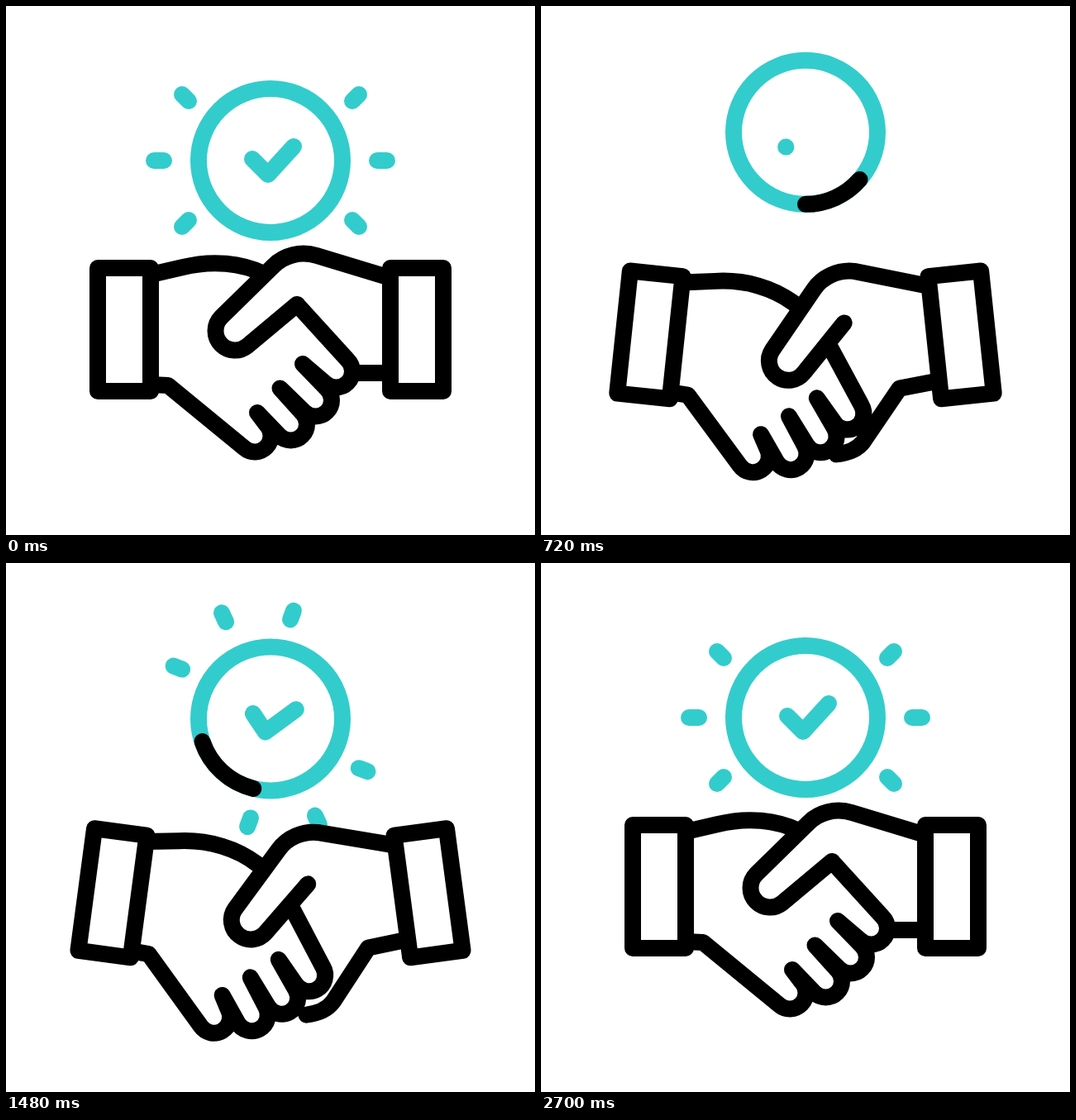
These frames come from a looping animation (640x640 px, 3.6 s). An HTML page with a canvas:

```html
<!DOCTYPE html>
<html lang="en">
<head>
<meta charset="utf-8">
<title>Handshake</title>
<style>
  html, body { margin: 0; width: 100%; height: 100%; overflow: hidden; background: #fff; }
  canvas { display: block; width: 100vw; height: 100vh; object-fit: contain; }
</style>
</head>
<body>
<canvas id="stage" width="640" height="640"></canvas>
<script>
const ctx = document.getElementById('stage').getContext('2d');
const LOOP = 3600, TEAL = '#33cccc', RAD = Math.PI / 180;

const ramp = (t, from, length) => Math.max(0, Math.min(1, (t - from) / length));
const mix = (a, b, u) => a + (b - a) * u;
const between = (p, q, u) => [mix(p[0], q[0], u), mix(p[1], q[1], u)];

// Monotone cubic through [time, value] keys, flat at both ends and at turning points.
function track(...keys) {
  const last = keys.length - 1;
  const rate = i => (keys[i + 1][1] - keys[i][1]) / (keys[i + 1][0] - keys[i][0]);
  const slope = keys.map((_, i) => {
    if (i === 0 || i === last) return 0;
    const a = rate(i - 1), b = rate(i);
    return a * b > 0 ? 2 * a * b / (a + b) : 0;
  });
  return t => {
    if (t <= keys[0][0]) return keys[0][1];
    if (t >= keys[last][0]) return keys[last][1];
    const i = keys.findIndex(k => k[0] > t) - 1;
    const [t0, v0] = keys[i], [t1, v1] = keys[i + 1];
    const d = t1 - t0, u = (t - t0) / d, w = 1 - u;
    return v0 * w * w * (1 + 2 * u) + v1 * u * u * (3 - 2 * u)
      + d * u * w * (w * slope[i] - u * slope[i + 1]);
  };
}

// The arms swing twice; the fingers follow a little later.
const armTilt = track([0, 0], [580, 8], [1015, 0], [1425, 8], [1820, 0]);
const fingerTilt = t => armTilt(t - 142);
const thumbTilt = track([0, 0], [580, -6.3], [1280, 4.4], [1650, -6.3], [1920, 0]);
const ringY = track([0, 187], [595, 135], [940, 194], [1700, 187]);
const raySpin = track([0, 720], [460, 704], [940, 516], [1260, 193], [1700, -2.4],
  [1850, -9], [2700, 0]);
const tickTilt = track([0, 0], [940, -54], [1300, 14], [1700, 4], [2000, -16], [2700, 0]);
const tickLength = t => Math.max(1 - ramp(t, 160, 460), ramp(t, 720, 260));

const TICK = [[-22, -2], [-3, 17], [28, -17]];
const FINGERTIPS = [[399.5, 442], [374.5, 477], [344.5, 506], [301, 520]];

function spin(deg, x, y) {
  ctx.translate(x, y);
  ctx.rotate(deg * RAD);
  ctx.translate(-x, -y);
}

// Runs draw inside a local transform; the current path survives it.
function within(place, draw) {
  ctx.save();
  place();
  draw();
  ctx.restore();
}

function line(...pts) {
  ctx.beginPath();
  pts.forEach(p => ctx.lineTo(...p));
  ctx.stroke();
}

function arc(color, from, to) {
  ctx.strokeStyle = color;
  ctx.beginPath();
  ctx.arc(0, 0, 87, from * RAD, to * RAD);
  ctx.stroke();
}

// Rays return one by one, right side first, and leave in the reverse order.
function drawRays(t) {
  for (let i = 0; i < 6; i++) {
    const side = i < 3 ? 1 : -1, row = 1 - i % 3;
    const inner = [side * (row ? 99 : 129), row * 72];
    const outer = [inner[0] + side * (row ? 8 : 12), row * 80];
    const a = t < 800 ? ramp(t, 600 - 100 * i, 100) : 0;
    const b = t < 800 ? 1 : ramp(t, 890 + 98 * i, 100);
    if (b > a) line(between(inner, outer, a), between(inner, outer, b));
  }
}

function drawTick(t) {
  const bend = 0.37, len = tickLength(t), [a, b, c] = TICK;
  if (len <= 0) return;
  if (len <= bend) line(a, between(a, b, len / bend));
  else line(a, b, between(b, c, (len - bend) / (1 - bend)));
}

function drawBadge(t) {
  within(() => ctx.translate(320, ringY(t)), () => {
    arc(TEAL, 0, 360);
    const head = 90 - 360 * ramp(t, 596, 920);
    const tail = 90 - 360 * ramp(t, 920, 700);
    if (tail > head) arc('#000', head, tail);

    ctx.strokeStyle = TEAL;
    within(() => spin(raySpin(t), 0, 0), () => drawRays(t));
    const tilt = tickTilt(t);
    within(() => spin(tilt, 0, tilt < 0 ? 10 : 0), () => drawTick(t));
  });
}

function drawHands(t) {
  const arm = armTilt(t), lag = fingerTilt(t), wrist = 0.6 * lag;
  const leftArm = () => spin(arm, 77, 289);
  const rightArm = () => spin(-arm, 563, 289);
  const leftBack = () => { leftArm(); spin(wrist, 183, 323); };
  const rightPalm = () => { rightArm(); spin(-wrist, 465, 444); };
  const fingers = () => { leftArm(); spin(lag, 260, 388); };
  const thumb = () => { rightArm(); spin(thumbTilt(t), 369, 296); };

  const leftTop = () => {
    ctx.moveTo(175, 325);
    ctx.lineTo(214, 316);
    ctx.bezierCurveTo(250, 307, 285, 311, 312, 324);
    ctx.lineTo(330, 334);
  };
  const knuckles = () => {
    ctx.lineTo(352, 361);
    FINGERTIPS.forEach(([x, y], i) => {
      ctx.arc(x, y, 19.5, -45 * RAD, (i < 3 ? 135 : 130) * RAD);
      if (i < 3) ctx.lineTo(359 - 27.5 * i, 433 + 29.5 * i);
    });
  };
  const leftBottom = () => {
    ctx.lineTo(196, 459);
    ctx.lineTo(175, 458);
  };
  const thumbOutline = () => {
    ctx.lineTo(376, 302);
    ctx.bezierCurveTo(356, 296, 336, 302, 324, 314);
    ctx.arc(277, 393, 23.5, 225 * RAD, 50.6 * RAD, true);
    ctx.lineTo(352, 361);
  };
  const cuff = x => {
    ctx.beginPath();
    ctx.rect(x, 317, 64, 149);
    ctx.fill();
    ctx.stroke();
  };

  ctx.strokeStyle = '#000';
  ctx.fillStyle = '#fff';

  // Far edge of the right palm
  within(rightPalm, () => {
    ctx.beginPath();
    ctx.moveTo(465, 444);
    ctx.lineTo(416, 444);
    ctx.lineTo(361, 499);
    ctx.quadraticCurveTo(349, 510, 326, 508);
    ctx.stroke();
  });

  // Left hand: filled whole, outlined only where it shows
  ctx.beginPath();
  within(leftBack, leftTop);
  within(fingers, knuckles);
  within(leftArm, leftBottom);
  ctx.fill();

  ctx.beginPath();
  within(leftBack, leftTop);
  within(fingers, () => { ctx.moveTo(352, 361); knuckles(); });
  within(leftArm, leftBottom);
  ctx.stroke();

  // Right hand and thumb
  ctx.beginPath();
  within(thumb, thumbOutline);
  ctx.fill();

  ctx.beginPath();
  within(rightArm, () => ctx.moveTo(465, 329));
  within(thumb, thumbOutline);
  ctx.stroke();

  within(leftArm, () => cuff(111));
  within(rightArm, () => cuff(465));
}

function render(t) {
  ctx.fillStyle = '#fff';
  ctx.fillRect(0, 0, 640, 640);
  ctx.lineWidth = 20;
  ctx.lineCap = ctx.lineJoin = 'round';
  drawBadge(t);
  drawHands(t);
}

const start = performance.now();
function frame() {
  render((performance.now() - start) % LOOP);
  requestAnimationFrame(frame);
}
frame();
</script>
</body>
</html>
```
